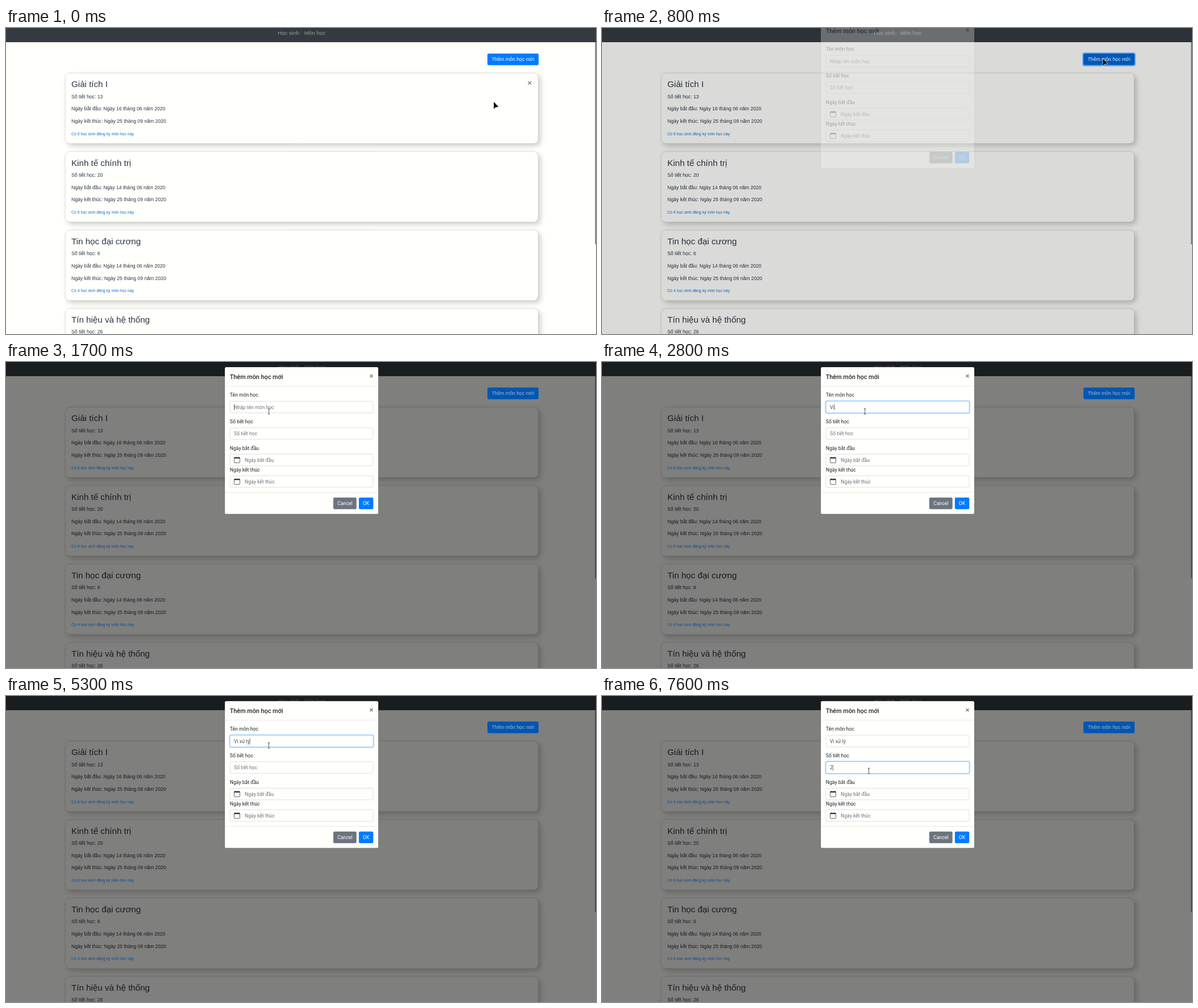
These frames come from a looping animation (1038x539 px, 8 s). An HTML page with a canvas:

```html
<!DOCTYPE html>
<html lang="vi">
<head>
<meta charset="utf-8">
<title>Môn học</title>
<style>
  html, body { margin: 0; width: 100%; height: 100%; overflow: hidden; background: #fffffc; }
  canvas { display: block; }
</style>
</head>
<body>
<canvas id="stage" width="1038" height="539"></canvas>
<script>
const W = 1038, H = 539, LOOP = 8000;
const K = W / 1920; // page pixels to stage pixels
const SANS = '"Liberation Sans", Arial, sans-serif';
const ROBOTO = 'Roboto, sans-serif';
const PAPER = '#fffffc', INK = '#2a3644', DARK = '#212529', MUTED = '#6c757d';

const stage = document.getElementById('stage').getContext('2d');
const layer = document.createElement('canvas');
layer.width = W;
layer.height = H;
const modalCtx = layer.getContext('2d');

const clamp = v => Math.max(0, Math.min(1, v));
const smooth = v => v * v * (3 - 2 * v);

function text(c, str, x, y, size, color, font = SANS, weight = 400, align = 'left') {
  c.save();
  c.translate(x, y);
  c.scale(K, K);
  c.font = `${weight} ${size}px ${font}`;
  c.textAlign = align;
  c.fillStyle = color;
  c.fillText(str, 0, 0);
  c.restore();
}

function textWidth(c, str, size, font) {
  c.font = `${size}px ${font}`;
  return c.measureText(str).width * K;
}

function box(c, x, y, w, h, r, fill, stroke, line = 0.6) {
  c.beginPath();
  c.roundRect(x, y, w, h, r);
  if (fill) { c.fillStyle = fill; c.fill(); }
  if (stroke) { c.strokeStyle = stroke; c.lineWidth = line; c.stroke(); }
}

function dim(rgb, f) {
  return `rgb(${rgb.map(v => Math.round(v * f)).join(',')})`;
}

// ---- page ----
const courses = [
  ['Giải tích I', 13, 16, 6],
  ['Kinh tế chính trị', 20, 14, 6],
  ['Tin học đại cương', 6, 14, 4],
  ['Tín hiệu và hệ thống', 26, 14, 5]
];
const cardTop = i => 79.2 + i * 138.25;

function drawCard(c, [name, lessons, day], i, hovered) {
  const y = cardTop(i);
  c.save();
  c.shadowColor = 'rgba(0,0,0,0.2)';
  c.shadowBlur = 10;
  c.shadowOffsetX = 4;
  c.shadowOffsetY = 4;
  box(c, 104, y, 832.5, 124.5, 8, PAPER);
  c.restore();
  box(c, 104.2, y + 0.2, 832.1, 124.1, 8, null, 'rgba(0,0,0,0.16)', 0.8);
  text(c, name, 115, y + 25.2, 28, INK);
  text(c, `Số tiết học: ${lessons}`, 115, y + 44.5, 16, INK);
  text(c, `Ngày bắt đầu: Ngày ${day} tháng 06 năm 2020`, 115, y + 66.1, 16, INK);
  text(c, 'Ngày kết thúc: Ngày 25 tháng 09 năm 2020', 115, y + 87.8, 16, INK);
  if (hovered) text(c, '×', 921.4, y + 22, 24, 'rgba(0,0,0,0.5)', SANS, 700, 'center');
}

function drawPage(c, t, pos, shade) {
  c.fillStyle = PAPER;
  c.fillRect(0, 0, W, H);
  courses.forEach((course, i) => drawCard(c, course, i, i === 0 && t < 700 && pos.y > 79));
  c.fillStyle = '#343a40';
  c.fillRect(0, 0, W, 25);
  text(c, 'Học sinh', 478, 12, 18, 'rgba(255,255,255,0.5)');
  text(c, 'Môn học', 524.7, 12, 18, 'rgba(255,255,255,0.5)');
  c.fillStyle = 'rgba(0,0,0,0.5)';
  c.fillRect(1036.4, 25, 1.6, 356);
  c.fillStyle = `rgba(0,0,0,${shade})`;
  c.fillRect(0, 0, W, H);

  // Saturated blues keep more of their strength under the backdrop.
  const f = 1 - 0.6 * shade;
  courses.forEach((course, i) =>
    text(c, `Có ${course[3]} học sinh đăng ký môn học này`, 115, cardTop(i) + 109.6, 12.8, dim([10, 112, 215], f)));

  const focused = t >= 700 && t < 1100;
  const hovered = t < 700 && pos.y < 66;
  const blue = focused ? [0, 98, 204] : hovered ? [0, 105, 217] : [0, 123, 255];
  if (focused) box(c, 846, 44, 92, 22.4, 3, null, `rgba(0,123,255,${0.55 * f})`, 2);
  box(c, 847, 45, 90, 20.5, 2.2, dim(blue, f));
  text(c, 'Thêm môn học mới', 892, 58.2, 16, dim([255, 255, 255], f), SANS, 400, 'center');
}

// ---- dialog ----
// [time, text, underline last letter]
const typing = [
  [2600, 'V'], [2800, 'Vi'], [3100, 'Vi '], [3200, 'Vi x'], [3500, 'Vi xu', true],
  [3700, 'Vi xư', true], [4500, 'Vi xử', true], [4800, 'Vi xử '], [5100, 'Vi xử l'],
  [5300, 'Vi xử lý', true], [5900, 'Vi xử lý']
];

function caretOn(t) {
  return (t >= 1700 && t < 2300) || (t >= 2400 && t < 4300) ||
         (t >= 4500 && t < 6100) || t >= 7000;
}

function input(c, y, placeholder, { value = '', underline, focus, caret, x = 401 } = {}) {
  if (focus) box(c, 393.2, y - 0.8, 253.6, 22, 3, null, 'rgba(0,123,255,0.28)', 2);
  box(c, 394, y, 252, 20.4, 2.2, PAPER, focus ? '#80bdff' : '#ced4da', 0.7);
  text(c, value || placeholder, x, y + 13.5, 16, value ? '#495057' : MUTED, ROBOTO);
  const end = x + textWidth(c, value, 16, ROBOTO);
  c.fillStyle = '#495057';
  if (underline) {
    const start = x + textWidth(c, value.slice(0, -1), 16, ROBOTO);
    c.fillRect(start + 0.3, y + 15.1, end - start - 0.6, 0.6);
  }
  if (caret) c.fillRect(end, y + 5, 0.7, 10.8);
}

function calendar(c, y) {
  box(c, 401.4, y + 0.9, 10, 9.5, 1.2, null, '#2b2f33', 0.75);
  c.fillStyle = '#2b2f33';
  c.fillRect(401.4, y + 0.9, 10, 1.9);
  c.fillRect(403.1, y, 0.7, 1);
  c.fillRect(409, y, 0.7, 1);
}

function button(c, label, x, w, fill, enabled) {
  c.save();
  c.globalAlpha = enabled ? 1 : 0.65;
  box(c, x, 238.8, w, 20.5, 2.2, fill);
  text(c, label, x + w / 2, 252.2, 16, '#fff', ROBOTO, 400, 'center');
  c.restore();
}

function drawModal(c, t) {
  c.clearRect(0, 0, W, H);
  box(c, 385, 9, 270, 258.8, 2.6, PAPER, 'rgba(0,0,0,0.2)', 0.6);
  text(c, 'Thêm môn học mới', 393.8, 29.9, 20, DARK, ROBOTO, 500);
  text(c, '×', 643, 28.6, 24, 'rgba(0,0,0,0.5)', ROBOTO, 700, 'center');
  c.fillStyle = '#dee2e6';
  c.fillRect(385, 42.2, 270, 0.7);
  c.fillRect(385, 229.3, 270, 0.7);

  const labels = [['Tên môn học', 61.2], ['Số tiết học', 107.9], ['Ngày bắt đầu', 154.7], ['Ngày kết thúc', 192.6]];
  labels.forEach(([label, y]) => text(c, label, 393.8, y, 16, DARK, ROBOTO));

  const [, name = '', underline] = typing.filter(k => t >= k[0]).pop() || [];
  const caret = caretOn(t);
  input(c, 69.2, 'Nhập tên môn học', {
    value: name, underline, focus: t >= 1800 && t < 7000, caret: caret && t < 7000
  });
  input(c, 115.8, 'Số tiết học', {
    value: t >= 7600 ? '2' : '', focus: t >= 7000, caret: caret && t >= 7000
  });
  input(c, 162.4, 'Ngày bắt đầu', { x: 420 });
  input(c, 200.4, 'Ngày kết thúc', { x: 420 });
  calendar(c, 167.2);
  calendar(c, 205.2);

  const enabled = t >= 1100;
  button(c, 'Cancel', 575.8, 40.8, MUTED, enabled);
  button(c, 'OK', 620.8, 25.4, '#007bff', enabled);
}

// ---- pointer ----
// Each leg: start, end, from, to, easing
const legs = [
  [0, 500, [858, 130], [882, 54], smooth],
  [500, 800, [882, 54], [881, 54], v => v],
  [800, 900, [881, 54], [833, 65], v => v],
  [900, 1600, [833, 65], [462.5, 87], v => 1 - (1 - v) ** 2],
  [1600, 6500, [462.5, 87], [462.5, 87], v => v],
  [6500, 6600, [462.5, 87], [466.5, 88.5], v => v],
  [6600, 7100, [466.5, 88.5], [469.5, 132], smooth]
];

function pointerAt(t) {
  const leg = legs.find(l => t <= l[1]) || legs[legs.length - 1];
  const [start, end, from, to, ease] = leg;
  const p = ease(clamp((t - start) / (end - start)));
  return { x: from[0] + (to[0] - from[0]) * p, y: from[1] + (to[1] - from[1]) * p };
}

function drawPointer(c, t, { x, y }) {
  const beam = (t >= 1600 && t < 6600) || t >= 6900;
  c.save();
  c.translate(x, y);
  c.lineJoin = 'round';
  c.beginPath();
  if (beam) {
    c.moveTo(-1.9, -4.8); c.lineTo(1.9, -4.8);
    c.moveTo(0, -4.8); c.lineTo(0, 4.8);
    c.moveTo(-1.9, 4.8); c.lineTo(1.9, 4.8);
    c.strokeStyle = 'rgba(255,255,255,0.7)';
    c.lineWidth = 1.8;
    c.stroke();
    c.strokeStyle = '#333';
    c.lineWidth = 0.8;
    c.stroke();
  } else {
    c.moveTo(0.2, 0);
    c.lineTo(0.2, 12.8);
    c.lineTo(3.2, 9.8);
    c.lineTo(8.4, 8.8);
    c.closePath();
    c.strokeStyle = 'rgba(255,255,255,0.85)';
    c.lineWidth = 1.2;
    c.stroke();
    c.fillStyle = '#111';
    c.fill();
  }
  c.restore();
}

function draw(now) {
  const t = Math.floor((now % LOOP) / 100) * 100;
  const pos = pointerAt(t);
  const fade = clamp((t - 750) / 170);
  drawPage(stage, t, pos, fade * 0.5);
  if (fade > 0) {
    drawModal(modalCtx, t);
    const slide = Math.sin(clamp((t - 750) / 340) * Math.PI / 2);
    stage.globalAlpha = fade;
    stage.drawImage(layer, 0, 0, W, H, 0, 0, W, H);
    stage.globalAlpha = 1;
    if (slide < 1) {
      drawPage(stage, t, pos, fade * 0.5);
      modalCtx.save();
      modalCtx.translate(0, -27 * (1 - slide));
      drawModal(modalCtx, t);
      modalCtx.restore();
      stage.globalAlpha = fade;
      stage.drawImage(layer, 0, 0);
      stage.globalAlpha = 1;
    }
  }
  drawPointer(stage, t, pos);
}

const began = performance.now();
function tick() {
  draw(performance.now() - began);
  requestAnimationFrame(tick);
}
tick();
</script>
</body>
</html>
```
